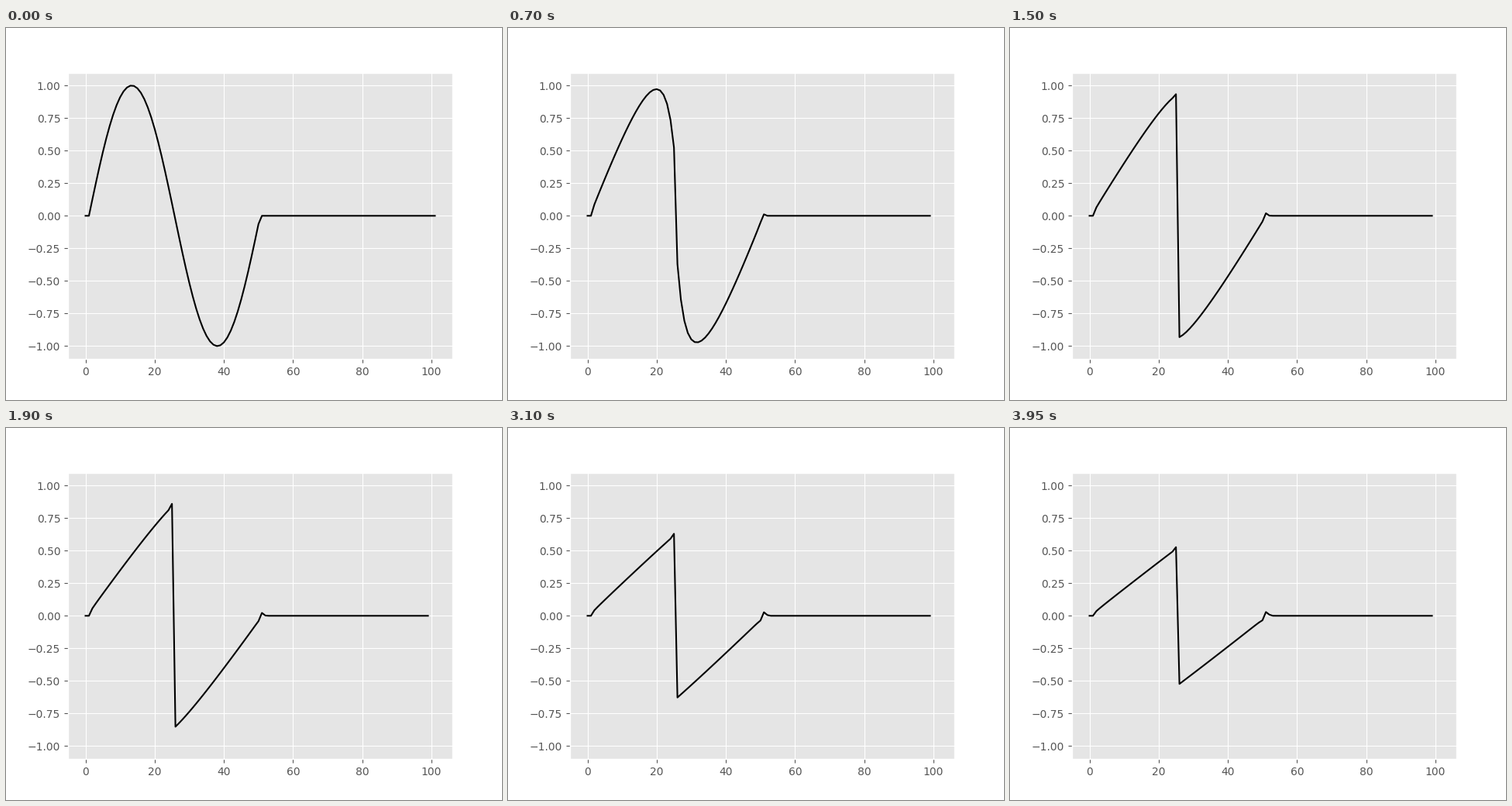
A matplotlib script for the animation above (4 s loop, 640 px wide and 480 px high).

```python
"""Inviscid Burgers equation: a sine pulse steepens into a standing shock."""
import numpy as np
import matplotlib.pyplot as plt
from matplotlib.animation import FuncAnimation

FRAMES, INTERVAL = 80, 50
CELLS, DT = 100, 0.01

x, dx = np.linspace(0, 2, CELLS, retstep=True)


def step(u):
    """One upwind step; the direction follows the local wave speed."""
    flux = u**2 / 2
    backward = flux[1:-1] - flux[:-2]
    forward = flux[2:] - flux[1:-1]
    rightward = u[1:-1] + u[2:] >= 0
    new = u.copy()
    new[1:-1] -= DT / dx * np.where(rightward, backward, forward)
    return new


# one ghost cell on each side
history = [np.pad(np.where(x <= 1, np.sin(2 * np.pi * x), 0), 1)]
for _ in range(FRAMES - 1):
    history.append(step(history[-1]))

plt.style.use("ggplot")
fig, ax = plt.subplots(figsize=(6.4, 4.8), dpi=100)
line, = ax.plot(history[0], color="black", lw=1.5)
ax.set_xlim(ax.get_xlim())
ax.set_ylim(ax.get_ylim())


def update(n):
    u = history[n] if n == 0 else history[n][:CELLS]
    line.set_data(np.arange(len(u)), u)
    return line,


anim = FuncAnimation(fig, update, frames=FRAMES, interval=INTERVAL,
                     repeat=True, repeat_delay=0)
plt.show()
```
